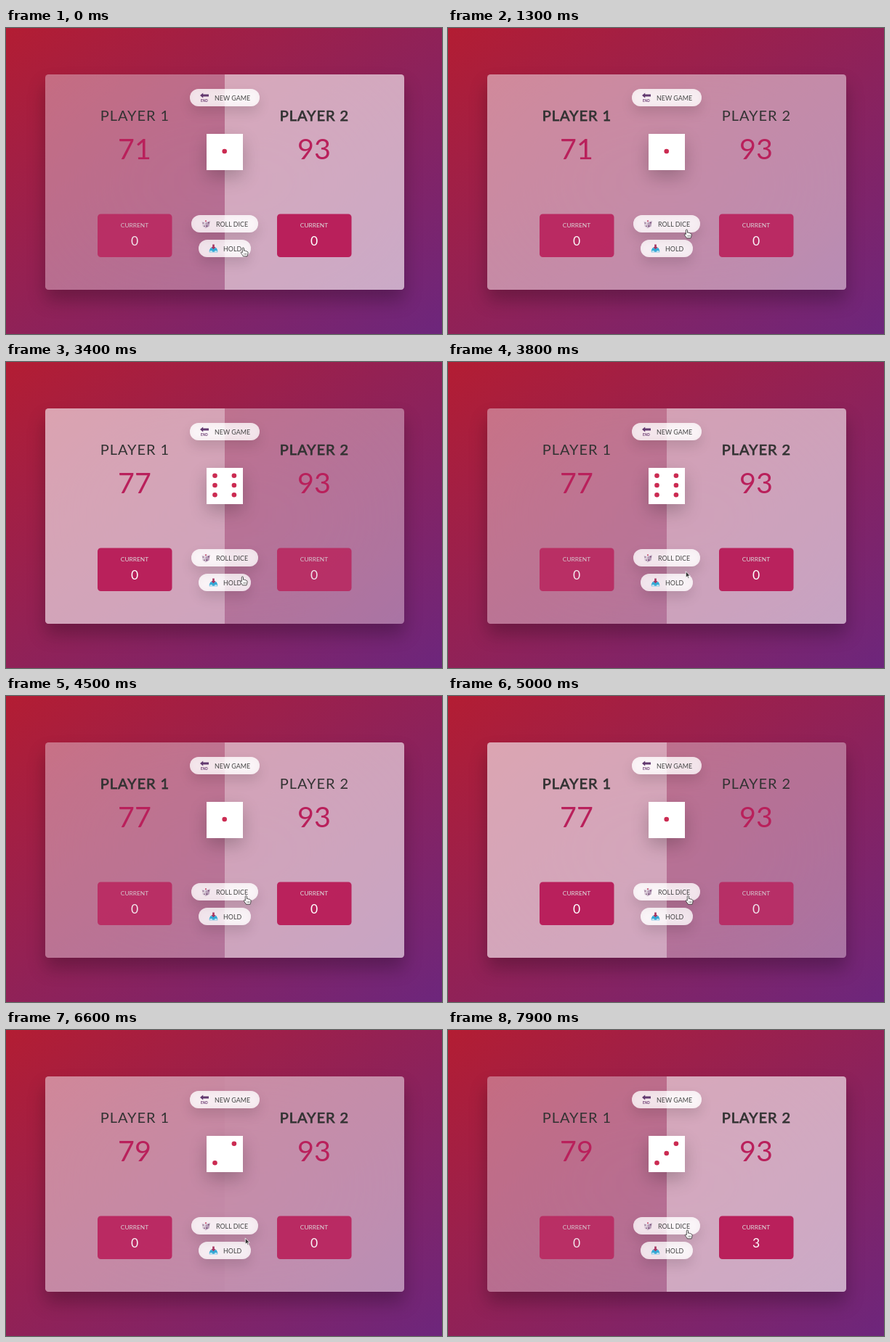
Animation of 600x422 px, one loop 8 s. Source, as an HTML page:

```html
<!DOCTYPE html>
<html lang="en">
<head>
<meta charset="utf-8">
<title>Dice game</title>
<style>
  html, body { margin: 0; width: 100%; height: 100%; overflow: hidden; }
  body { position: relative; background: linear-gradient(to top left, #6d267c, #b31d33); }
  div, svg { position: absolute; box-sizing: border-box; }
  #panel {
    left: 54px; top: 64px; width: 494px; height: 296.5px;
    border-radius: 4.5px; overflow: hidden;
    background: rgba(255, 255, 255, .35);
    backdrop-filter: blur(100px);
  }
  #shadow {
    left: 54px; top: 64px; width: 494px; height: 296.5px;
    border-radius: 4.5px; box-shadow: 0 15px 25px rgba(0, 0, 0, .25);
  }
  .side { top: 0; width: 247px; height: 100%; background: rgba(255, 255, 255, .4); }
  .side + .side { left: 247px; }
  .btn {
    height: 24px; border-radius: 12px;
    background: rgba(255, 255, 255, .72);
    backdrop-filter: blur(5px);
    box-shadow: 0 8.6px 17px rgba(0, 0, 0, .12);
  }
  #die {
    left: 222px; top: 82px; width: 49.5px; height: 49.5px;
    background: #fff; box-shadow: 0 10px 25px rgba(0, 0, 0, .22);
  }
  svg { left: 0; top: 0; }
  text { font-family: Lato, "Open Sans", sans-serif; }
  .mid { text-anchor: middle; }
  .name { font-size: 20px; letter-spacing: .95px; fill: #333; stroke: #333; stroke-width: 0; }
  .score { font-size: 39.5px; fill: #b9205b; }
  .box { fill: #b9205b; }
  .label { font-size: 8.4px; fill: #ddd; }
  .points { font-size: 17.5px; fill: #fff; }
  .cap { font-size: 8.9px; fill: #444; }
</style>
</head>
<body>
<div id="shadow"></div>
<div id="panel">
  <div class="side"></div>
  <div class="side"></div>
  <div id="die"></div>
  <div class="btn" style="left:199px;top:20px;width:96px"></div>
  <div class="btn" style="left:201px;top:194px;width:92px"></div>
  <div class="btn" style="left:211px;top:228px;width:72px"></div>
</div>
<svg width="600" height="422" viewBox="0 0 600 422">
  <g id="players"></g>
  <g id="pips" fill="#cb2b52"></g>

  <text class="cap" x="287" y="100" textLength="">NEW GAME</text>
  <text class="cap" x="289" y="274">ROLL DICE</text>
  <text class="cap" x="299" y="308">HOLD</text>

  <!-- end arrow -->
  <path d="M267 93l4.2-3.6v2.2h7.8v2.8h-7.8v2.2z" fill="#633a70"/>
  <text x="268" y="101.6" font-size="4.6" font-weight="700" fill="#69386f">END</text>
  <!-- dice -->
  <path d="M269.5 266.5l5 1.8v8l-4-2.6z" fill="#d9cbd7"/>
  <path d="M274.5 268.3l6.3-2.3-1.2 7.6-5.1 2.7z" fill="#b79fb8"/>
  <path d="M269.5 266.5l5.6-2 5.7 1.5-6.3 2.3z" fill="#efe6ee"/>
  <g fill="#6d3f6c">
    <circle cx="271.3" cy="269" r=".8"/><circle cx="273" cy="273.3" r=".8"/>
    <circle cx="276.4" cy="273.2" r=".9"/><circle cx="278.9" cy="268.6" r=".9"/>
  </g>
  <circle cx="275" cy="266.3" r="1" fill="#c23a5c"/>
  <!-- inbox -->
  <path d="M281.4 303.2h8.2l1.6 3.6v2.4h-11.4v-2.4z" fill="#35a9d6"/>
  <path d="M280.4 307.2h3l.8 1.2h2.6l.8-1.2h3v1.5h-10.2z" fill="#e3f1f7"/>
  <path d="M284.2 298.4h2.6v3.6h1.9l-3.2 3.3-3.2-3.3h1.9z" fill="#a63460"/>

  <g id="hand">
    <path d="M-1.2 1.1C-1.2-.4 1-.4 1 1.1V4.3C1.5 3.6 2.8 3.8 3 4.7 3.6 4.2 4.7 4.5 4.8 5.4 5.6 5 6.5 5.6 6.5 6.5V8.4C6.5 9.9 5.6 10.4 5.5 11.8H-.2C-.4 10.3-2.4 8.9-3.1 7.1-3.5 6 -2.4 5.5-1.2 6.8Z"
          fill="#fff" stroke="#333" stroke-width=".85" stroke-linejoin="round"/>
    <path d="M1.3 7.6v2.3M3 7.6v2.3M4.6 7.6v2.3" stroke="#333" stroke-width=".55"/>
  </g>
  <path id="arrow" d="M0 0V8.6L2 6.8 3.4 9.8 4.7 9.2 3.4 6.3H6Z" fill="#333" stroke="#fff" stroke-width=".8"/>
</svg>
<script>
const LOOP = 8000, FADE = 750;
const $ = id => document.getElementById(id);

// [time, value] steps
const turns = [[-FADE, 1], [1080, 0], [3340, 1], [4430, 0], [6370, 1]];
const rolls = [[0, 1], [2400, 6], [4430, 1], [5500, 2], [7400, 3]];
const totals = [[[0, 71], [3340, 77], [6370, 79]], [[0, 93]]];
const currents = [
  [[0, 0], [2400, 6], [3340, 0], [5500, 2], [6370, 0]],
  [[0, 0], [7400, 3]]
];
// [time, x, y] of the pointer tip
const path = [
  [0, 326.5, 303], [250, 326.5, 303], [800, 328.5, 278], [2650, 328.5, 278],
  [3150, 325.5, 296], [3600, 325.5, 296], [4100, 330.5, 275.5], [5750, 330.5, 275.5],
  [6150, 329, 298], [6400, 329, 298], [6800, 329.5, 276], [8000, 329.5, 276]
];

$('players').innerHTML = [177, 424].map((x, i) => `
  <text class="name mid" x="${x + .4}" y="128.2">PLAYER ${i + 1}</text>
  <text class="score mid" x="${x}" y="180.5"></text>
  <g class="current">
    <rect class="box" x="${x - 51}" y="256.5" width="102.5" height="59.5" rx="4.5"/>
    <text class="label mid" x="${x}" y="275">CURRENT</text>
    <text class="points mid" x="${x}" y="300"></text>
  </g>`).join('');

const all = sel => [...document.querySelectorAll(sel)];
const sides = all('.side'), names = all('.name'), scores = all('.score'),
      boxes = all('.current'), points = all('.points');

const stepAt = (steps, t) => steps.filter(s => s[0] <= t).pop();

// CSS "ease": cubic-bezier(.25, .1, .25, 1)
function ease(x) {
  if (x >= 1) return 1;
  const bez = (a, b, u) => 3 * a * u * (1 - u) ** 2 + 3 * b * u * u * (1 - u) + u ** 3;
  let lo = 0, hi = 1;
  for (let i = 0; i < 20; i++) {
    const u = (lo + hi) / 2;
    if (bez(.25, .25, u) < x) lo = u; else hi = u;
  }
  return bez(.1, 1, lo);
}

function pointerAt(t) {
  const i = path.findIndex(p => p[0] > t);
  const [t0, x0, y0] = path[i - 1], [t1, x1, y1] = path[i];
  const u = (t - t0) / (t1 - t0), k = u * u * (3 - 2 * u);
  return [x0 + (x1 - x0) * k, y0 + (y1 - y0) * k];
}

function pips(n) {
  const spots = [];
  if (n % 2) spots.push([0, 0]);
  if (n > 1) spots.push([1, -1], [-1, 1]);
  if (n > 3) spots.push([-1, -1], [1, 1]);
  if (n === 6) spots.push([-1, 0], [1, 0]);
  return spots.map(([x, y]) =>
    `<circle cx="${300.7 + 13.2 * x}" cy="${170 + 13.2 * y}" r="3.3"/>`).join('');
}

let face;
function draw(t) {
  const [since, active] = stepAt(turns, t);
  const k = ease((t - since) / FADE);
  for (const i of [0, 1]) {
    const on = i === active, level = on ? k : 1 - k;
    sides[i].style.opacity = level;
    boxes[i].style.opacity = .8 + .2 * level;
    names[i].style.strokeWidth = on ? .75 : 0;
    scores[i].textContent = stepAt(totals[i], t)[1];
    points[i].textContent = stepAt(currents[i], t)[1];
  }

  const roll = stepAt(rolls, t)[1];
  if (roll !== face) $('pips').innerHTML = pips(face = roll);

  const [x, y] = pointerAt(t);
  const over = (y > 258 && y < 282) || (y > 292 && y < 316);
  for (const [id, shown] of [['hand', over], ['arrow', !over]]) {
    $(id).setAttribute('transform', `translate(${x} ${y})`);
    $(id).style.display = shown ? '' : 'none';
  }
}

const start = performance.now();
function tick() {
  draw((performance.now() - start) % LOOP);
  requestAnimationFrame(tick);
}
tick();
</script>
</body>
</html>
```
